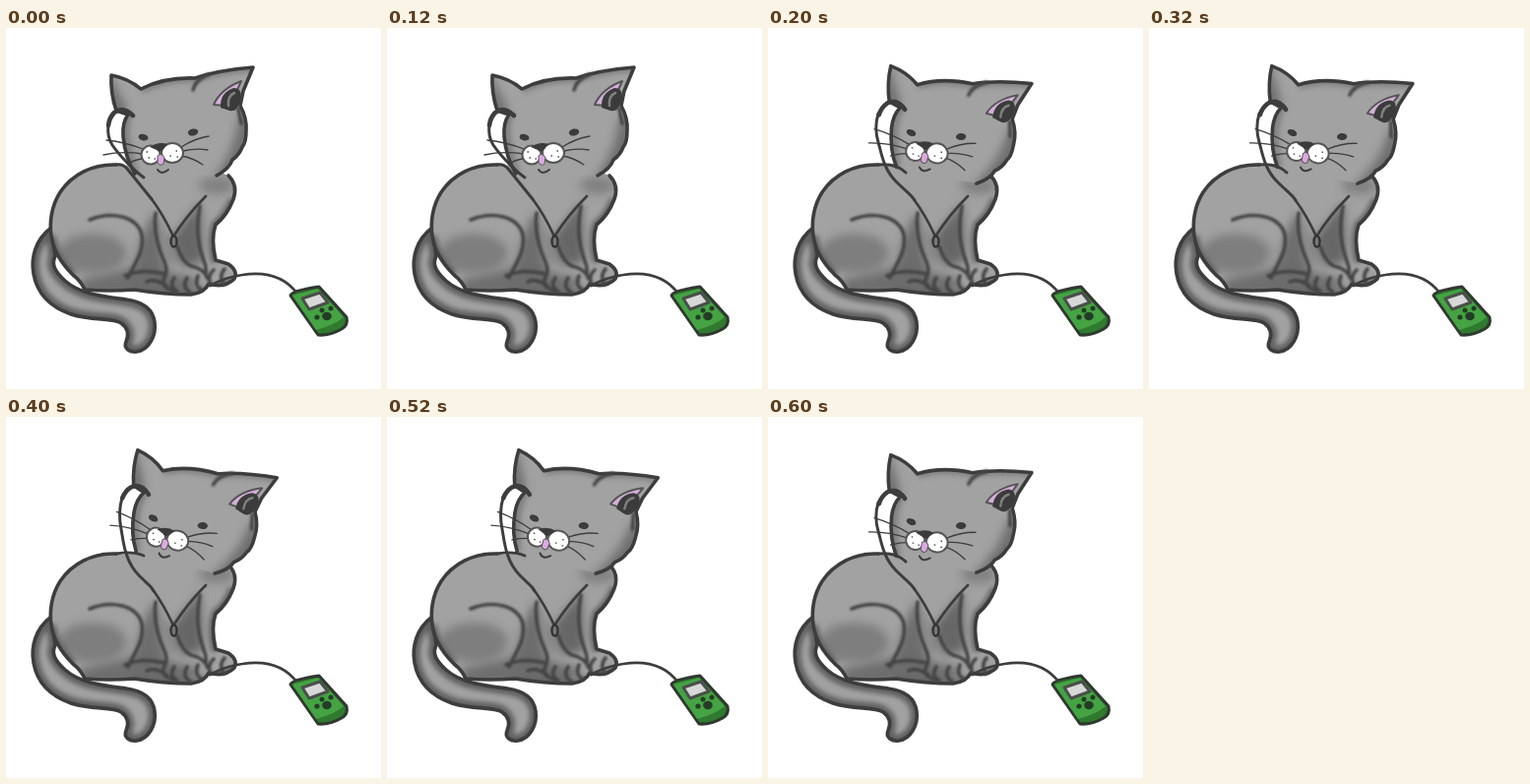
An HTML page that plays this animation: 381x367 px, repeating every 0.8 s.

```html
<!DOCTYPE html>
<html lang="en">
<head>
<meta charset="utf-8">
<title>Cat with music player</title>
<style>
  html, body { margin: 0; width: 100%; height: 100%; overflow: hidden; background: #fff; }
  svg { display: block; width: 381px; height: 367px; }
  .line { fill: none; stroke: #3d3d3d; stroke-width: 3.6; stroke-linecap: round; stroke-linejoin: round; }
  .soft { stroke: #444; stroke-width: 3.6; filter: url(#smudge); }
  .thin { stroke-width: 1.3; }
  .fur { fill: #a2a2a2; }
  .edge { fill: none; stroke: #606060; stroke-width: 9; filter: url(#haze); }
  .shade { fill: #666; filter: url(#blur); }
  .ink { fill: #3b3b3b; }
</style>
</head>
<body>
<svg viewBox="0 0 381 367">
  <defs>
    <filter id="blur" x="-60%" y="-60%" width="220%" height="220%"><feGaussianBlur stdDeviation="5"/></filter>
    <filter id="haze" x="-20%" y="-20%" width="140%" height="140%"><feGaussianBlur stdDeviation="2.5"/></filter>
    <filter id="smudge" x="-20%" y="-20%" width="140%" height="140%"><feGaussianBlur stdDeviation=".8"/></filter>
    <path id="tail" d="M46 203C30 215 25 233 28 250C32 272 46 284 66 291C88 298 108 294 117 300C124 305 125 312 122 319C119 326 126 330 133 329C145 327 153 313 151 299C149 284 137 278 122 276C99 273 76 271 60 257C49 247 46 240 50 232Z"/>
    <path id="body" d="M122 140C91 136 67 149 55 167C46 181 44 198 46 211C48 228 57 240 68 251Q76 257 80 266Q105 268 130 266Q160 271 188 271Q202 269 206 260Q222 265 232 255Q236 247 226 240L213 236Q208 214 213 200Q225 190 231 174Q236 160 226 150L160 125Z"/>
    <path id="head" d="M131 148Q121 132 119 110Q118 96 124 88L112 84Q106 66 107 48Q124 51 137 62Q160 50 192 51Q215 43 251 40Q246 52 241 64L238 79Q245 92 244 104Q244 117 240 121Q237 129 230 134Q227 143 214 150"/>
    <clipPath id="inTail"><use href="#tail"/></clipPath>
    <clipPath id="inBody"><use href="#body"/></clipPath>
    <clipPath id="inHead"><use href="#head"/></clipPath>
  </defs>

  <use href="#tail" class="fur"/>
  <g clip-path="url(#inTail)"><use href="#tail" class="edge" style="stroke-width:13"/></g>
  <use href="#tail" class="line"/>

  <use href="#body" class="fur"/>
  <g clip-path="url(#inBody)">
    <ellipse class="shade" cx="88" cy="229" rx="35" ry="20" opacity=".6"/>
    <path class="shade" d="M75 256L136 242L196 255L188 275H78Z" opacity=".85"/>
    <path class="shade" d="M150 188Q134 215 130 252L164 254Q154 225 154 192Z" opacity=".9"/>
    <path class="shade" d="M154 196L170 216L178 240L163 240Z" opacity=".4"/>
    <path class="shade" d="M168 214L198 176L200 238L179 242Z"/>
    <ellipse class="shade" cx="214" cy="160" rx="18" ry="9" opacity=".55"/>
    <path class="edge" d="M46 211C48 228 57 240 68 251M231 174Q225 190 213 200Q208 214 213 238M130 268L188 273L232 258"/>
  </g>
  <path class="line" d="M112 139C88 138 67 149 55 167C46 181 44 198 46 211C48 228 57 240 68 251Q76 257 80 266Q105 268 130 266Q160 271 188 271Q202 269 206 260Q222 265 232 255Q236 247 226 240L213 236Q208 214 213 200Q225 190 231 174Q236 160 226 150"/>
  <path class="line soft" d="M85 195C107 186 133 191 138 210C141 228 130 240 124 254M121 252Q138 244 161 250M143 258Q151 254 163 262M152 188Q149 212 161 238Q164 244 162 251Q157 260 163 264L171 268M174 222Q179 238 188 242Q202 245 205 255M171 254Q165 263 174 268M184 254Q178 263 187 269M195 252Q191 261 198 266M197 181Q191 211 201 237Q204 243 203 250M211 246Q204 252 208 261M222 245Q216 252 221 261"/>
  <path class="line" style="stroke-width:2.7" d="M148 174Q160 190 170 212Q184 190 203 171"/>
  <ellipse cx="170.5" cy="217" rx="3" ry="5.5" fill="#777" stroke="#333" stroke-width="2.4"/>
  <path class="line" style="stroke-width:2.6" d="M207 262Q224 253 240 251C265 247 284 254 296 270"/>

  <g stroke="#303830" stroke-width="3" stroke-linejoin="round">
    <path fill="#2f7a2f" d="M289 272Q290 267 318 263L346 294Q348 302 341 306Q329 313 317 312Z"/>
    <path fill="#45a343" stroke="none" d="M291 272L317 265L343 294Q334 302 315 307Z"/>
    <path fill="#d8d8d8" stroke="#4a4f4a" d="M301 275L319 269L327 279L308 286Z"/>
  </g>
  <g fill="#243c26">
    <ellipse cx="326" cy="293" rx="4.8" ry="4.2"/>
    <circle cx="316" cy="294" r="2.6"/><circle cx="321" cy="287" r="2.5"/><circle cx="330" cy="285" r="2.5"/>
  </g>

  <g id="headGroup">
    <use href="#head" class="fur"/>
    <g clip-path="url(#inHead)">
      <path class="shade" d="M256 82V140L208 156Q232 128 236 92Z" opacity=".85"/>
      <path class="shade" d="M104 46L124 84L112 92L100 66Z" opacity=".85"/>
      <path class="edge" d="M124 88Q116 108 131 148M137 62Q160 50 192 51Q215 43 251 40" opacity=".5"/>
    </g>
    <path fill="#d5b0da" stroke="#555" stroke-width="2" stroke-linejoin="round" d="M211 78Q218 62 239 54Q234 66 224 79Z"/>
    <path class="ink" d="M218 81Q217 66 231 61Q241 61 238 74Q235 86 227 84Z"/>
    <path class="line" style="stroke:#808080;stroke-width:2.5" d="M226 79Q225 69 232 66"/>
    <use href="#head" class="line"/>
    <path class="line soft" d="M190 63Q192 53 206 47M236 82L239 97"/>
    <path class="line" style="stroke-width:4.6" d="M129 89Q119 79 110 86Q105 91 104 99"/>
    <ellipse class="ink" cx="139.5" cy="111" rx="5" ry="3.3" transform="rotate(12 139 111)"/>
    <ellipse class="ink" cx="190" cy="106" rx="5.2" ry="3.5" transform="rotate(-12 190 106)"/>
    <path class="line thin" d="M102 114Q121 116 139 123M99 129Q118 125 139 128M123 138Q131 134 141 132M178 121Q192 112 206 110M180 125Q193 122 205 124M178 130Q190 132 200 139"/>
    <g fill="#fff" stroke="#555" stroke-width="2">
      <ellipse cx="147" cy="129" rx="9.5" ry="9.5"/>
      <ellipse cx="169" cy="127" rx="11" ry="10"/>
    </g>
    <path class="ink" d="M146 121Q155 115 164 118L159 124Q156 127 153 124Z"/>
    <path fill="#dba9df" stroke="#555" stroke-width="1" d="M154 130Q158 126 161 132L160 138Q157 141 154 137Z"/>
    <path class="line thin" d="M143 126h.5M145 132h.5M151 133h.5M167 130h.5M173 125h.5M174 131h.5"/>
    <path class="line" style="stroke-width:2" d="M154 144Q158 150 165 144"/>
  </g>
  <path id="neck" class="line" style="stroke-width:3"/>
  <path id="cord" class="line" style="stroke-width:3"/>
</svg>
<script>
  const STEP = 200;
  const left = {
    turn: "rotate(0)",
    neck: "M112 139Q119 138 123 143L148 174",
    cord: "M104 98C103 106 104 113 108 119S126 142 140 152"
  };
  const middle = {
    turn: "rotate(10.3 168 142)",
    neck: "M112 139Q130 137 140 147",
    cord: "M112 87C109 97 109 106 112 116S117 143 130 156S144 168 149 175"
  };
  const right = {
    turn: "rotate(14.4 177 147)",
    neck: "M112 139Q129 136 140 141",
    cord: "M118 82C115 92 115 104 117 114S120 146 135 161S146 170 150 177"
  };
  const poses = [left, middle, right, middle];
  const byId = id => document.getElementById(id);
  const head = byId("headGroup"), neck = byId("neck"), cord = byId("cord");
  const start = performance.now();
  let shown;

  function draw(now) {
    const i = Math.floor(Math.max(0, now - start) / STEP) % poses.length;
    const pose = poses[i];
    if (pose !== shown) {
      head.setAttribute("transform", pose.turn);
      neck.setAttribute("d", pose.neck);
      cord.setAttribute("d", pose.cord);
      shown = pose;
    }
    requestAnimationFrame(draw);
  }
  draw(start);
</script>
</body>
</html>
```
